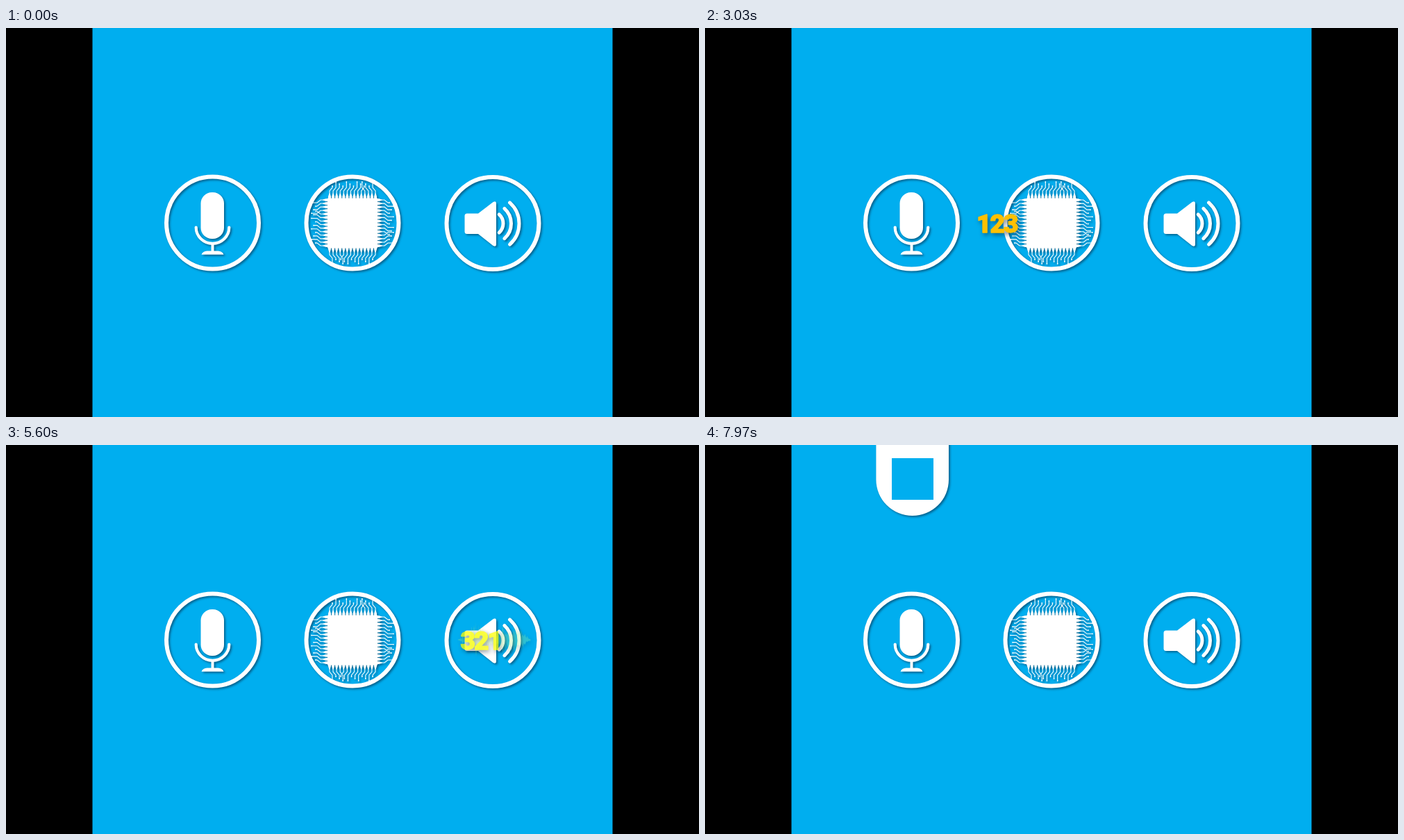
Animation, 998 px wide and 561 px high, one loop 8 s. Source, as an HTML page:

```html
<!DOCTYPE html>
<html lang="en">
<head>
<meta charset="utf-8">
<title>Sound to digits and back</title>
<style>
  html, body { margin: 0; width: 100%; height: 100%; overflow: hidden; background: #000; }
  svg { display: block; width: 100vw; height: 100vh; }
  .icon { filter: drop-shadow(2px 2.5px 1.8px rgba(0, 25, 50, .5)); }
  .mover { filter: drop-shadow(2px 3px 3px rgba(0, 20, 40, .5)); }
  .line { fill: none; stroke: #fff; }
  text {
    font: 900 37px Roboto, "Open Sans", sans-serif;
    letter-spacing: -2px; text-anchor: middle;
    stroke-width: 1.4px; stroke-linejoin: round;
  }
</style>
</head>
<body>
<svg viewBox="0 0 998 561" preserveAspectRatio="none">
  <defs>
    <clipPath id="inner"><circle r="64"/></clipPath>
  </defs>
  <rect x="124" width="750" height="561" fill="#00aeef"/>

  <g class="icon" fill="#fff">
    <circle class="line" cx="297.5" cy="281" r="66.5" stroke-width="6"/>
    <rect x="280.5" y="237" width="33.5" height="67" rx="16"/>
    <path class="line" stroke-width="4.2" stroke-linecap="round" d="M273.700 287.500a23.800 23.300 0 0 0 47.600 0"/>
    <path d="M295.500 310h4v11.500h6q6 .3 8 5.300h-32q2-5 8-5.300h6z"/>
  </g>

  <g class="icon" transform="translate(499 281)">
    <g id="traces" clip-path="url(#inner)"></g>
    <rect x="-36" y="-35.500" width="72" height="72" fill="#fff"/>
    <circle class="line" r="66.5" stroke-width="6"/>
  </g>

  <g class="icon" fill="#fff">
    <circle class="line" cx="701" cy="281.500" r="66.5" stroke-width="6"/>
    <path d="M664 267.500h16l21.500-16.500q4.500-2.500 4.500 2.500v58q0 5-4.500 2.500L680 297h-16q-3.500 0-3.500-3.500v-22.500q0-3.500 3.500-3.500z"/>
    <path id="arcs" class="line" stroke-width="5" stroke-linecap="round"/>
  </g>

  <g id="voice" class="mover" fill="#fff"></g>
  <g id="echo" class="mover" fill="#9fee8c"></g>
  <g id="input" class="mover"><text y="13.500" fill="#ffc000" stroke="#ffc000">123</text></g>
  <g id="output" class="mover"><text y="13.500" fill="#ffff00" stroke="#ffff00">321</text></g>

  <g id="tab" class="icon">
    <path d="M246.400-120h104.600V50a52.300 52 0 0 1-104.600 0z" fill="#fff"/>
    <rect x="269" y="19" width="60" height="60" fill="#00aeef"/>
  </g>

  <rect width="124.500" height="561"/>
  <rect x="873.500" width="125" height="561"/>
</svg>
<script>
const LOOP = 8000, MID = 281;
const el = id => document.getElementById(id);
const part = (t, a, b) => Math.min(1, Math.max(0, (t - a) / (b - a)));
const mix = (a, b, p) => a + (b - a) * p;
const smooth = p => (1 - Math.cos(Math.PI * p)) / 2;
const easeOut = p => Math.sin(p * Math.PI / 2);

function random(seed) {
  return () => (seed = (seed * 16807) % 2147483647) / 2147483647;
}

// Concentric sound arcs in front of the speaker.
el('arcs').setAttribute('d', [17.5, 29, 40.5].map(r => {
  const x = 698.5 + r * Math.cos(.84), dy = r * Math.sin(.84);
  return `M${x} ${282 - dy}A${r} ${r} 0 0 1 ${x} ${282 + dy}`;
}).join(''));

// Circuit traces: one side is built, then turned four ways.
function chipSide() {
  let pins = '', wires = '', dots = '';
  for (let i = 0; i < 14; i++) {
    const x = -33 + i * 5.08;
    const bend = i < 10 ? 4 : -4;
    const end = -53 - (i * 5 % 3) * 3;
    pins += `M${x - 2}-35v-3l1.400-4.500h1.200l1.400 4.500v3z`;
    wires += `M${x}-42V-46l${bend}-5V${end}`;
    dots += `<circle cx="${x + bend}" cy="${end}" r=".9"/>`;
  }
  return `<path d="${pins}"/><path class="line" stroke-width="1.1" d="${wires}"/>${dots}`;
}
el('traces').innerHTML = [0, 90, 180, 270]
  .map(a => `<g fill="#fff" transform="rotate(${a})">${chipSide()}</g>`).join('');

const envelope = [[0, 3], [4, 6], [10, 18], [18, 28], [30, 32], [42, 30], [49, 14],
  [64, 16], [73, 31], [82, 36], [88, 15], [96, 10], [105, 1]];

function loudness(x) {
  const i = Math.max(1, envelope.findIndex(p => p[0] >= x));
  const [a, b] = [envelope[i - 1], envelope[i]];
  return mix(a[1], b[1], part(x, a[0], b[0]));
}

function wavePath(seed, step) {
  const rnd = random(seed), top = [], bottom = [];
  for (let x = 0, i = 0; x <= 105; x += step, i++) {
    const size = () => loudness(x) * (i % 2 ? .35 + .7 * rnd() : .15 + .25 * rnd());
    const px = (x - 52.5).toFixed(1);
    top.push(`${px} ${(-size()).toFixed(1)}`);
    bottom.unshift(`${px} ${size().toFixed(1)}`);
  }
  return `M${top.concat(bottom).join('L')}z`;
}
const wave = `<path opacity=".5" d="${wavePath(4271, 1)}"/><path d="${wavePath(977, 1.6)}"/>`;
el('voice').innerHTML = wave;
el('echo').innerHTML = `<g transform="scale(-1 .73)">${wave}</g>`;

function place(id, x, opacity) {
  const node = el(id);
  node.setAttribute('transform', `translate(${x.toFixed(2)} ${MID})`);
  node.setAttribute('opacity', opacity.toFixed(3));
  node.style.display = opacity > 0 ? '' : 'none';
}

function outputX(t) {
  if (t < 4537) return mix(499, 533, part(t, 3700, 4537) ** 2);
  if (t < 5385) return mix(533, 672, part(t, 4537, 5370));
  return mix(672, 701, easeOut(part(t, 5385, 6200)));
}

function draw(t) {
  place('voice', mix(183, 303, smooth(part(t, 367, 2030))),
    part(t, 367, 700) * (1 - part(t, 1840, 2030)));

  const inX = t < 3715 ? mix(272, 500, smooth(part(t, 2040, 3700))) : outputX(t);
  place('input', inX, part(t, 2040, 2300) * (1 - part(t, 3900, 4400)));
  place('output', outputX(t), part(t, 3800, 4300) * (1 - part(t, 5450, 6000)));

  place('echo', mix(703, 932, part(t, 6200, 7340) ** 1.4),
    t < 7340 ? part(t, 5400, 6100) : 0);

  const drop = part(t, 7667, 7970);
  el('tab').setAttribute('transform', `translate(0 ${mix(-110, 0, drop).toFixed(2)})`);
  el('tab').style.display = drop > 0 ? '' : 'none';
}

const start = performance.now();
function tick() {
  draw((performance.now() - start) % LOOP);
  requestAnimationFrame(tick);
}
tick();
</script>
</body>
</html>
```
